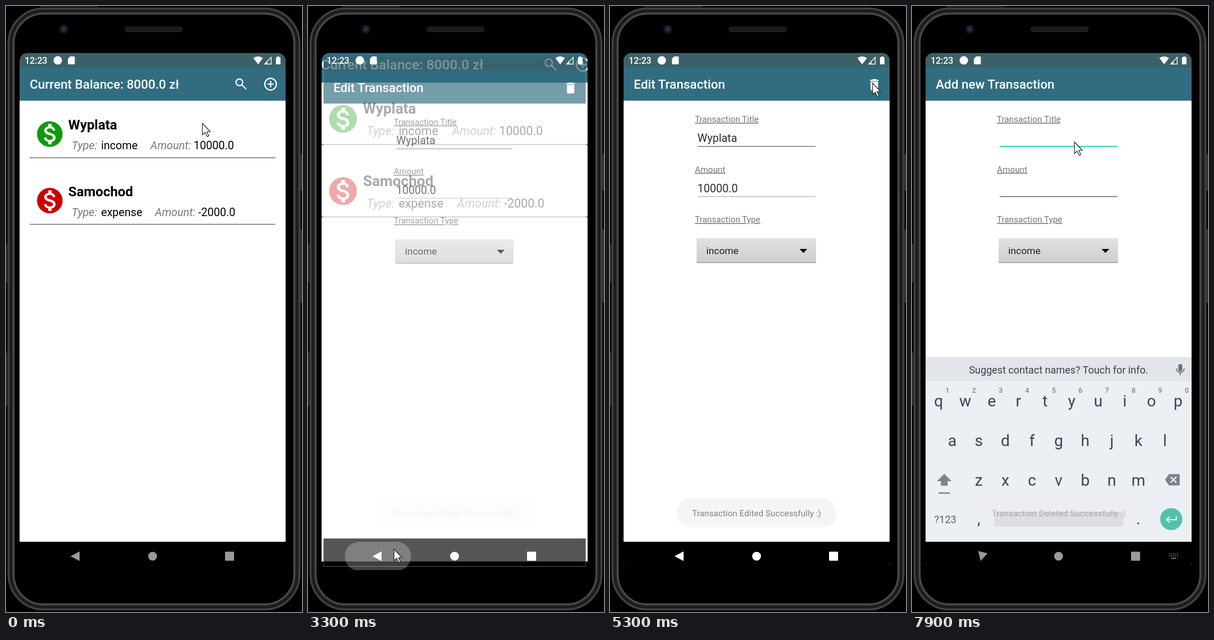
Animation of 523x1070 px, one loop 8000 ms. Source, as an HTML page:

```html
<!DOCTYPE html>
<html lang="en">
<head>
<meta charset="utf-8">
<title>Budget app walkthrough</title>
<style>
html, body { margin: 0; width: 100%; height: 100%; overflow: hidden; background: #000; }
svg { display: block; width: 100vw; height: 100vh; font-family: Roboto, sans-serif; font-size: 19.6px; }
text { white-space: pre; }
.title { font-size: 22.3px; font-weight: 500; fill: #fff; }
.name { font-size: 23.9px; font-weight: 700; }
.hint { font-style: italic; fill: #777; }
.value { fill: #2c2c2c; }
.label { font-size: 15.2px; fill: #757575; text-decoration: underline; }
.toast text { font-size: 15.2px; text-anchor: middle; fill: #2a2a2a; }
.key { font-size: 28px; text-anchor: middle; fill: #37474f; }
.num { font-size: 12.5px; font-weight: 500; text-anchor: middle; fill: #7b868c; }

/* Paused animations are positioned by the clock through --t. */
.anim { animation: 8s cubic-bezier(.22, 0, .1, 1) infinite both paused; animation-delay: calc(var(--t, 0) * -1ms); }
.window { transform-origin: 259px 540px; }
.list { animation-name: list; }
.before { animation-name: before; animation-timing-function: step-end; }
.after { animation-name: after; animation-timing-function: step-end; }
.edit { animation-name: edit; }
.add { animation-name: add; }
.fade { animation-timing-function: linear; }
.edit-fade { animation-name: edit-fade; }
.add-fade { animation-name: add-fade; }
.edited { animation-name: edited; }
.deleted { animation-name: deleted; }
.nav { animation-name: nav; }
.ripple { animation-name: ripple; }
.back { animation-name: back; transform-origin: 123px 971px; }
.focus { animation-name: focus; animation-timing-function: step-end; }
.switcher { animation-name: switcher; animation-timing-function: step-end; }
.keyboard { animation-name: keyboard; }
.cursor { animation-name: cursor; animation-timing-function: ease-in-out; }

@keyframes list {
  0%, 30.625%, 49.375%, 73.75%, 82.5% { transform: scale(1); animation-timing-function: linear; }
  35.94%, 40.625%, 54.69%, 68.44%, 87.81%, 100% { transform: scale(1.1); }
  45.94% { transform: scale(1); }
}
@keyframes before { 0% { visibility: visible; } 68%, 100% { visibility: hidden; } }
@keyframes after { 0% { visibility: hidden; } 68%, 100% { visibility: visible; } }
@keyframes edit {
  0%, 30.625%, 45.94%, 49.375%, 73.75%, 100% { transform: scale(.9); }
  35.94%, 40.625%, 54.69%, 68.44% { transform: scale(1); }
}
@keyframes edit-fade {
  0%, 30.625%, 42.5%, 49.375%, 70.3%, 100% { opacity: 0; }
  33.125%, 40.625%, 51.9%, 68.44% { opacity: 1; }
}
@keyframes add { 0%, 82.5% { transform: scale(.9); } 87.81%, 100% { transform: scale(1); } }
@keyframes add-fade { 0%, 82.5% { opacity: 0; } 85%, 100% { opacity: 1; } }
@keyframes edited { 0%, 41%, 68%, 100% { opacity: 0; } 45%, 65% { opacity: 1; } }
@keyframes deleted { 0%, 69.4%, 100% { opacity: 0; } 73%, 95.6% { opacity: 1; } }
@keyframes nav { 0%, 39.5%, 80%, 100% { fill: #999; } 40.5%, 71% { fill: #fff; } }
@keyframes ripple { 0%, 39.5%, 45%, 100% { opacity: 0; } 40.6%, 41.25% { opacity: 1; } }
@keyframes back { 0%, 96% { transform: rotate(0); } 98.75%, 100% { transform: rotate(-76deg); } }
@keyframes focus { 0% { visibility: hidden; } 95%, 100% { visibility: visible; } }
@keyframes switcher { 0% { visibility: hidden; } 97.5%, 100% { visibility: visible; } }
@keyframes keyboard { 0%, 95% { transform: translateY(326px); } 98.5%, 100% { transform: none; } }
@keyframes cursor {
  0% { transform: translate(347px, 207px); }
  6.25%, 8.75% { transform: translate(470px, 688px); }
  13.75% { transform: translate(491px, 1013px); }
  18.75% { transform: translate(274px, 260px); }
  23.75% { transform: translate(284px, 227px); }
  30.6%, 31.9% { transform: translate(284px, 225px); }
  39.4%, 41.9% { transform: translate(152px, 959px); }
  47.5%, 49.4% { transform: translate(240px, 225px); }
  53.75%, 56.25% { transform: translate(465px, 650px); }
  65%, 68.75% { transform: translate(464px, 136px); }
  72.5%, 76.25% { transform: translate(433px, 208px); }
  80.6%, 82.5% { transform: translate(464px, 135px); }
  85% { transform: translate(428px, 214px); }
  92.5%, 100% { transform: translate(287px, 240px); }
}
</style>
</head>
<body>
<svg id="stage" viewBox="0 0 523 1070" preserveAspectRatio="none"></svg>
<script>
const text = (cls, x, y, content) => `<text class="${cls}" x="${x}" y="${y}">${content}</text>`;
const rect = (x, y, w, h, fill, rx = 0, extra = '') =>
  `<rect x="${x}" y="${y}" width="${w}" height="${h}" rx="${rx}" fill="${fill}" ${extra}/>`;
const line = (x1, x2, y, color, width = 1.4) =>
  `<path d="M${x1} ${y}H${x2}" stroke="${color}" stroke-width="${width}"/>`;

const page = title => rect(24, 166, 470, 781, '#fff') + rect(24, 83, 470, 84, '#316c80') +
  rect(24, 83, 470, 25, '#3d6068') + rect(24, 167, 470, 1.5, '#dfe4e6') +
  rect(24, 946, 470, 50, '#000') + text('title', 42, 146, title);

const DOLLAR = 'M13.41 18.09V20h-2.67v-1.93c-1.71-.36-3.16-1.46-3.27-3.4h1.96c.1 1.05.82 1.87 2.65 1.87 ' +
  '1.96 0 2.4-.98 2.4-1.59 0-.83-.44-1.61-2.67-2.14-2.48-.6-4.18-1.62-4.18-3.67 0-1.72 1.39-2.84 ' +
  '3.11-3.21V4h2.67v1.95c1.86.45 2.79 1.86 2.85 3.39H14.3c-.05-1.11-.64-1.87-2.22-1.87-1.5 0-2.4.68' +
  '-2.4 1.64 0 .84.65 1.39 2.67 1.91s4.18 1.39 4.18 3.91c-.01 1.83-1.38 2.83-3.12 3.16z';

const row = (dy, color, name, type, amount, shift) => `<g transform="translate(0 ${dy})">
  <g transform="translate(50.3 199) scale(2.26)"><circle cx="12" cy="12" r="10" fill="${color}"/>
  <path d="${DOLLAR}" fill="#fff"/></g>
  ${text('name', 110, 218, name)}${text('hint', 116, 253, 'Type:')}${text('', 168, 253, type)}
  ${text('hint', 255 + shift, 253, 'Amount:')}${text('', 331.5 + shift, 253, amount)}
  ${line(42, 476, 268, '#707070', 1.6)}</g>`;
const expense = dy => row(dy, '#cb0000', 'Samochod', 'expense', '-2000.0', 8);

const listIcons = `<g fill="none" stroke="#fff" stroke-width="2.2">
  <circle cx="412.3" cy="134.8" r="5.9"/><path d="M416.5 139l8 8"/>
  <circle cx="467.5" cy="138" r="10.3"/><path d="M462 138h11M467.5 132.5v11"/></g>`;
const list = balance => page(`Current Balance: ${balance} zł`) + listIcons;

const trash = `<path transform="translate(453.8 125.8) scale(1.1)" fill="#fff"
  d="M6 19c0 1.1.9 2 2 2h8c1.1 0 2-.9 2-2V7H6v12zM19 4h-3.5l-1-1h-5l-1 1H5v2h14V4z"/>`;

const form = (title, amountLine, values = []) => page(title) +
  ['Transaction Title', 'Amount', 'Transaction Type']
    .map((label, i) => text('label', 150, 205 + 88.6 * i, label)).join('') +
  values.map((value, i) => text('value', 154.5, 240 + 88.5 * i, value)).join('') +
  line(155, 363, 248, '#777') + line(155, 363, 336.5, amountLine) +
  rect(153, 411, 211, 43, '#aaa', 2) + rect(153, 410, 211, 42, 'url(#button)', 2) +
  `<text x="170" y="438" font-size="17.4" fill="#222">income</text><path d="M335 429h13.5l-6.75 7z"/>`;

const toast = (cls, width, message) => `<g class="anim fade toast ${cls}">
  ${rect(259 - width / 2, 869, width, 51.5, '#eee', 24)}${text('', 259, 900.5, message)}</g>`;

const keys = (letters, x, y) =>
  [...letters].map((letter, i) => text('key', x + 47 * i, y, letter)).join('');

const keyboard = `<g class="anim keyboard">
  ${rect(24, 620, 470, 326, '#eceff3')}${rect(24, 620, 470, 42, '#e2e5e9')}
  <text x="259" y="649" font-size="17.9" text-anchor="middle" fill="#37444a">Suggest contact names? Touch for info.</text>
  ${rect(470.5, 632, 7, 13, '#66757c', 3.5)}
  <path d="M467 640a7 7 0 0 0 14 0M474 647v5" fill="none" stroke="#66757c" stroke-width="1.8"/>
  ${keys('qwertyuiop', 47, 707)}${keys('asdfghjkl', 71, 777)}${keys('zxcvbnm', 118, 847)}
  ${[...'1234567890'].map((n, i) => text('num', 62.5 + 47 * i, 683, n)).join('')}
  <path d="M57 826l13 13h-7v8h-12v-8h-7z" fill="#78868c"/>${line(47, 67, 860, '#78868c', 2.5)}
  <path d="M447 836.5l7-10h19v20h-19z" fill="#78868c"/>
  <path d="M457 831.5l10 10M467 831.5l-10 10" stroke="#fff" stroke-width="2"/>
  <text x="59" y="913" font-size="18" text-anchor="middle" fill="#55636a">?123</text>
  ${keys(',', 118, 915)}${keys('.', 400, 915)}${rect(145, 893, 228, 26, '#d5d9dd', 4)}
  <circle cx="458" cy="906" r="19.5" fill="#53c1aa"/>
  <path d="M467 901v6h-17M455 902l-5.5 5 5.5 5" fill="none" stroke="#fff" stroke-width="2"/></g>`;

const rim = (inset, color, width) => rect(inset, inset, 523 - 2 * inset, 1070 - 2 * inset, 'none', 66 - inset,
  `stroke="${color}" stroke-width="${width}"`);
const phone = rect(0, 0, 523, 1070, '#000') +
  rim(9, '#2a2a2a', 13) + rim(4.5, '#484848', 2) + rim(8.5, '#191919', 3) + rim(13.5, '#555', 2) +
  rect(60, 0, 103, 1.5, '#333') +
  rect(519, 261, 4, 65, '#333', 1) + rect(519, 394, 4, 130, '#333', 1) +
  rect(0, 420, 2, 68, '#333') + rect(0, 612, 2, 94, '#333') +
  `<circle cx="102" cy="41" r="8" fill="#15171d"/><circle cx="102" cy="41" r="4" fill="#26304a"/>` +
  rect(210.5, 37, 101, 8.5, '#1b1b1b', 4, 'stroke="#292929"');

const statusIcons = `<g fill="#fff"><text x="33" y="102" font-size="15.8" font-weight="500">12:23</text>
  <circle cx="91.5" cy="96" r="7.5"/><path d="M113.5 89h6.5q1.5 0 1.5 1.5v11q0 1.5-1.5 1.5h-9q-1.5 0-1.5-1.5v-8.5z"/>
  <path d="M445.5 103l-8.5-11q8.5-6 17 0zM462 96.5v6.5h-6z"/>
  <path d="M457 102.5h11.5v-12z" fill="none" stroke="#fff" stroke-width="1.3"/>
  <path d="M479.5 89h3v1.5h2.5v12.5h-8v-12.5h2.5z"/></g>`;

const navIcons = `<rect class="anim fade ripple" x="65" y="946" width="117" height="51" rx="25" fill="#fff" fill-opacity=".25"/>
  <g class="anim fade nav"><path class="anim fade back" d="M114 971.5l16-8.5v17z"/>
  <circle cx="259" cy="971.5" r="7.8"/><rect x="387" y="963.5" width="16" height="16" rx="1"/></g>
  <g class="anim switcher" stroke="#888" stroke-width="1.6" stroke-dasharray="1.8 1.7">
  <path d="M454 967.5h17M454 971h17"/><path d="M458 975h9" stroke-dasharray="none"/></g>`;

document.getElementById('stage').innerHTML = `<defs>
  <clipPath id="screen"><rect x="24" y="83" width="470" height="913" rx="14"/></clipPath>
  <clipPath id="content"><rect x="24" y="83" width="470" height="863"/></clipPath>
  <linearGradient id="button" x2="0" y2="1"><stop stop-color="#e2e2e2"/><stop offset="1" stop-color="#cecece"/></linearGradient>
  </defs>${phone}<g clip-path="url(#screen)">
  <g class="anim window list">
    <g class="anim before">${list('8000.0')}${row(0, '#109a0c', 'Wyplata', 'income', '10000.0', 0)}${expense(117.5)}</g>
    <g class="anim after">${list('-2000.0')}${expense(0)}</g></g>
  <g class="anim fade edit-fade"><g class="anim window edit">
    ${form('Edit Transaction', '#bbb', ['Wyplata', '10000.0'])}${trash}</g></g>
  <g class="anim fade add-fade">${rect(24, 83, 470, 913, '#000', 0, 'opacity=".15"')}<g class="anim window add">
    ${form('Add new Transaction', '#666')}<g class="anim focus">${line(155, 363, 248, '#3fdcc6', 2.4)}</g></g></g>
  <g clip-path="url(#content)">${keyboard}</g>
  ${toast('edited', 281, 'Transaction Edited Successfully :)')}
  ${toast('deleted', 291, 'Transaction Deleted Successfully :)')}
  ${statusIcons}${navIcons}</g>
  <path class="anim cursor" d="M0 0v20.5l4.7-4.3 3.6 7.5 3-1.4-3.5-7.3h6.2z" fill="#fff" stroke="#222" stroke-width="1.2"/>`;

function tick() {
  const time = Math.floor(performance.now() % 8000 / 100) * 100;
  document.documentElement.style.setProperty('--t', time);
  requestAnimationFrame(tick);
}
tick();
</script>
</body>
</html>
```
